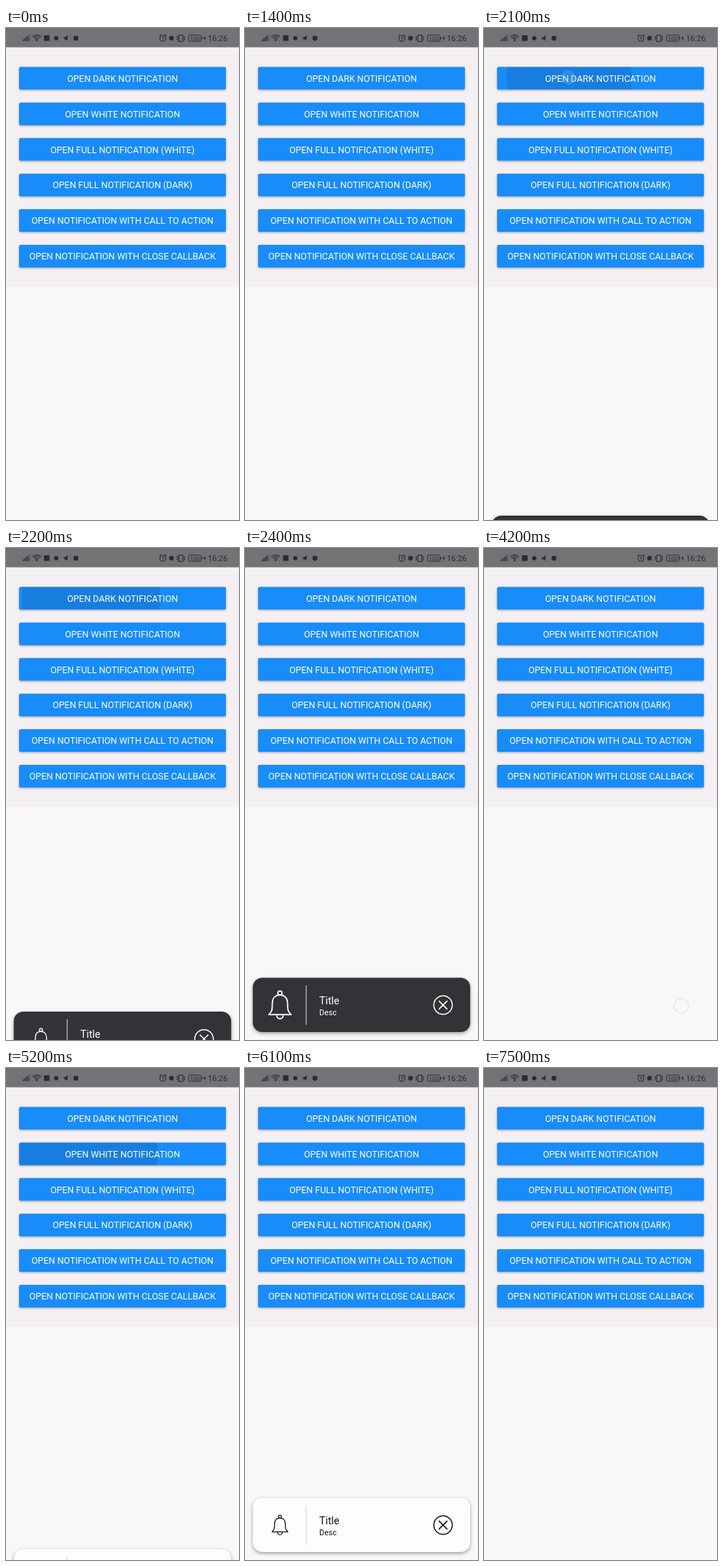
Animation of 320x676 px, one loop 8 s. Source, as an HTML page with a canvas:

```html
<!DOCTYPE html>
<html lang="en">
<head>
<meta charset="utf-8">
<title>Notifications demo</title>
<style>
  html, body { margin: 0; width: 100%; height: 100%; overflow: hidden; background: #faf7fa; }
  canvas { display: block; width: 320px; height: 676px; }
</style>
</head>
<body>
<canvas id="stage"></canvas>
<script>
const W = 320, H = 676, LOOP = 8000, STEP = 100;
const canvas = document.getElementById('stage');
const ctx = canvas.getContext('2d');
const ratio = window.devicePixelRatio || 1;
canvas.width = W * ratio;
canvas.height = H * ratio;

const FONT = 'Roboto, sans-serif';
const INK = '#2d2b2e';
const BUTTON = { x: 18, y: 53.5, w: 284, h: 31, gap: 48.9 };
const LABELS = [
  'OPEN DARK NOTIFICATION',
  'OPEN WHITE NOTIFICATION',
  'OPEN FULL NOTIFICATION (WHITE)',
  'OPEN FULL NOTIFICATION (DARK)',
  'OPEN NOTIFICATION WITH CALL TO ACTION',
  'OPEN NOTIFICATION WITH CLOSE CALLBACK'
];
const CARDS = [
  { tap: 1900, rise: 2000, close: 4000, linger: 4800, row: 0, touchX: 117,
    fill: '#343236', ink: '#ffffff', line: '#dedde0' },
  { tap: 4900, rise: 5069, close: 6700, linger: 6900, row: 1, touchX: 113,
    fill: '#fefcff', ink: '#151416', line: '#d3d1d4' }
];

const clamp = v => Math.min(1, Math.max(0, v));
const progress = (t, start, length) => clamp((t - start) / length);
const easeInOut = u => (1 - Math.cos(Math.PI * u)) / 2;

function box(x, y, w, h, r, fill) {
  ctx.beginPath();
  ctx.roundRect(x, y, w, h, r);
  ctx.fillStyle = fill;
  ctx.fill();
}

function disc(x, y, r, fill) {
  ctx.beginPath();
  ctx.arc(x, y, r, 0, Math.PI * 2);
  ctx.fillStyle = fill;
  ctx.fill();
}

function ring(x, y, r, from = 0, to = Math.PI * 2) {
  ctx.beginPath();
  ctx.arc(x, y, r, from, to);
  ctx.stroke();
}

function lines(...paths) {
  ctx.beginPath();
  for (const [x, y, ...rest] of paths) {
    ctx.moveTo(x, y);
    for (let i = 0; i < rest.length; i += 2) ctx.lineTo(rest[i], rest[i + 1]);
  }
  ctx.stroke();
}

function text(str, x, y, size, fill, align = 'left') {
  ctx.font = `${size}px ${FONT}`;
  ctx.textAlign = align;
  ctx.fillStyle = fill;
  ctx.fillText(str, x, y);
}

function setShadow(blur, dy, color) {
  ctx.shadowBlur = blur * ratio;
  ctx.shadowOffsetY = dy * ratio;
  ctx.shadowColor = color;
}

function drawStatusBar() {
  box(0, 0, W, 26.5, 0, '#747276');
  ctx.strokeStyle = INK;
  ctx.lineWidth = 1.1;
  for (let i = 0; i < 5; i++) {
    box(23 + i * 2.2, 15.5 - i * 1.6, 1.3, 2.5 + i * 1.6, 0, i < 4 ? INK : '#555357');
  }
  for (const r of [2.8, 5.2, 7.6]) ring(42, 17, r, -Math.PI * 0.79, -Math.PI * 0.21);
  disc(42, 16.8, 1.2, INK);
  box(52.2, 10, 7.6, 7.8, 1, INK);
  disc(69, 14, 3, INK);

  // muted speaker
  ctx.beginPath();
  ctx.moveTo(79.5, 12.5);
  ctx.lineTo(81.5, 12.5);
  ctx.lineTo(85, 10);
  ctx.lineTo(84.2, 17.5);
  ctx.lineTo(81.5, 15.5);
  ctx.lineTo(79.5, 15.5);
  ctx.fillStyle = INK;
  ctx.fill();
  disc(96, 14, 3.4, INK);

  // alarm clock
  ring(215.5, 14.3, 4);
  lines([215.5, 12, 215.5, 14.5, 217.3, 15.3], [210.7, 11.2, 213, 9.2], [218, 9.2, 220.3, 11.2]);
  disc(227.3, 14, 3.2, INK);

  // vibrating phone
  ctx.strokeRect(237.4, 9.7, 5.4, 8.8);
  lines([235.3, 11, 235.3, 17], [245, 11, 245, 17]);

  // battery
  ctx.lineWidth = 0.9;
  ctx.beginPath();
  ctx.roundRect(250.8, 9.8, 17, 8.4, 1.2);
  ctx.stroke();
  box(268.3, 12.5, 1.2, 3, 0, INK);
  text('100', 259.3, 17, 8, INK, 'center');
  ctx.beginPath();
  ctx.moveTo(273.4, 10);
  ctx.lineTo(271, 14.6);
  ctx.lineTo(272.7, 14.6);
  ctx.lineTo(272.2, 18);
  ctx.lineTo(274.8, 13.2);
  ctx.lineTo(273, 13.2);
  ctx.fillStyle = INK;
  ctx.fill();
  text('16:26', 304.3, 17.9, 10.9, INK, 'right');
}

function drawRipple(t, card, y) {
  const grow = t - card.tap;
  if (grow < 100 || grow > 400) return;
  ctx.save();
  ctx.beginPath();
  ctx.roundRect(BUTTON.x, y, BUTTON.w, BUTTON.h, 2);
  ctx.clip();
  ctx.globalAlpha = 0.13 * (1 - progress(grow, 300, 150));
  const radius = grow < 200 ? 45 : 86 + (grow - 200) * 0.09;
  disc(card.touchX, y + 15, radius, '#10203a');
  ctx.restore();
}

function drawButtons(t) {
  LABELS.forEach((label, i) => {
    const y = BUTTON.y + i * BUTTON.gap;
    ctx.save();
    setShadow(3, 1, 'rgba(0,0,0,.35)');
    box(BUTTON.x, y, BUTTON.w, BUTTON.h, 2, '#188cf8');
    ctx.restore();
    for (const card of CARDS) if (card.row === i) drawRipple(t, card, y);
    text(label, 160, y + 20.2, 12.44, '#ffffff', 'center');
  });
}

function drawBell(scale, color) {
  ctx.save();
  ctx.translate(48, 628);
  ctx.scale(scale, scale);
  ctx.strokeStyle = color;
  ctx.lineWidth = 1.25;
  ctx.lineJoin = 'round';
  ring(0, -11.7, 2);
  ctx.beginPath();
  ctx.moveTo(-10.8, 9.3);
  ctx.bezierCurveTo(-7.5, 6, -7.4, 4.5, -7.4, -1.5);
  ctx.bezierCurveTo(-7.4, -6.7, -4.5, -9.7, 0, -9.7);
  ctx.bezierCurveTo(4.5, -9.7, 7.4, -6.7, 7.4, -1.5);
  ctx.bezierCurveTo(7.4, 4.5, 7.5, 6, 10.8, 9.3);
  ctx.closePath();
  ctx.stroke();
  ring(0, 10, 3.2, 0, Math.PI);
  ctx.restore();
}

function bellScale(age) {
  const swell = age < 400 ? progress(age, 150, 250) : 1 - progress(age, 400, 300);
  return 1 + 0.42 * easeInOut(swell);
}

function drawCard(t, card) {
  const alpha = 1 - progress(t, card.close, 200);
  if (t < card.rise || alpha === 0) return;
  const age = t - card.rise;
  ctx.save();
  ctx.globalAlpha = alpha;
  ctx.translate(0, 93 * (1 - easeInOut(progress(age, 0, 400))));
  ctx.save();
  setShadow(5, 2, 'rgba(0,0,0,.38)');
  box(10.7, 590.5, 298.6, 74.5, 13, card.fill);
  ctx.restore();

  box(83.5, 601, 1, 54, 0, card.line);
  drawBell(bellScale(age), card.ink);
  text('Title', 102, 626.5, 14.22, card.ink);
  text('Desc', 102, 642, 10.67, card.ink);
  ctx.strokeStyle = card.ink;
  ctx.lineWidth = 1.5;
  ctx.lineCap = 'round';
  ring(272, 628, 12.7);
  lines([266.6, 622.6, 277.4, 633.4], [277.4, 622.6, 266.6, 633.4]);
  ctx.restore();
}

function drawTouches(t, card) {
  if (t >= card.tap && t < card.tap + 300) {
    disc(card.touchX - 1, BUTTON.y + card.row * BUTTON.gap + 14.5, 10, 'rgba(130,190,245,.25)');
  }
  if (t >= card.close && t < card.linger) {
    disc(271, 629, 10, 'rgba(250,248,252,.4)');
    ctx.strokeStyle = 'rgba(215,212,222,.6)';
    ctx.lineWidth = 1.2;
    ring(271, 629, 10);
  }
}

function draw(t) {
  ctx.setTransform(ratio, 0, 0, ratio, 0, 0);
  box(0, 0, W, H, 0, '#faf7fa');
  box(0, 26, W, 330, 0, '#f3eff2');
  drawStatusBar();
  drawButtons(t);
  for (const card of CARDS) {
    drawCard(t, card);
    drawTouches(t, card);
  }
}

function tick() {
  const t = performance.now() % LOOP;
  draw(Math.floor(t / STEP) * STEP);
  requestAnimationFrame(tick);
}
tick();
</script>
</body>
</html>
```
